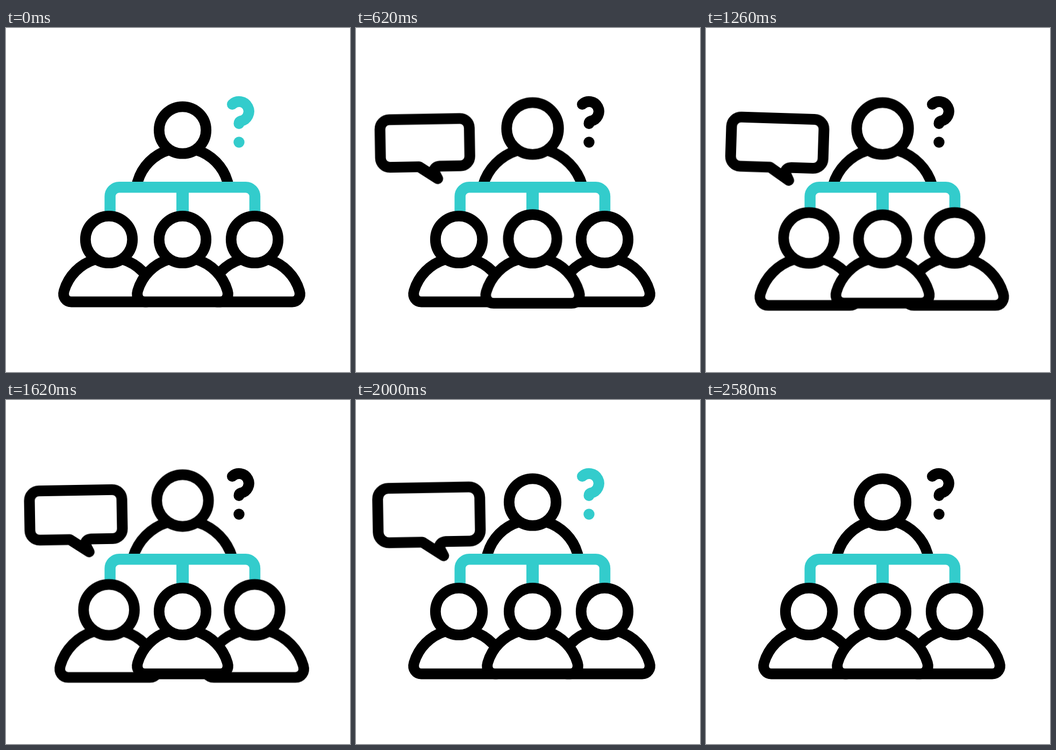
Animation, 640 px wide and 640 px high, one loop 2.72 s. Source, as an HTML page:

```html
<!DOCTYPE html>
<html lang="en">
<head>
<meta charset="utf-8">
<title>Team question</title>
<style>
  html, body { margin: 0; width: 100%; height: 100%; overflow: hidden; background: #fff; }
  svg { display: block; width: 100vw; height: 100vh; }

  /* outlines keep their weight while the shapes grow */
  path, circle { vector-effect: non-scaling-stroke; }
  .ink { fill: #fff; stroke: #000; stroke-width: 19.8; stroke-linejoin: round; }
  .teal { fill: none; stroke: #33cccc; stroke-width: 20.5; }
  .line { fill: none; stroke-linecap: round; stroke-width: 20; }

  .lead, .mid, .side, .pop, .swing, .ask {
    transform-box: view-box;
    animation: 2720ms cubic-bezier(.37, 0, .63, 1) infinite;
  }
  .lead { transform-origin: 328.5px 218.6px; animation-name: lead; }
  .mid { transform-origin: 328.5px 430.5px; animation-name: mid; }
  .side { animation-name: side; }
  .left { transform-origin: 191.5px 430.5px; }
  .right { transform-origin: 462.5px 430.5px; }
  .pop { transform-origin: 75px 214px; animation-name: pop; }
  .swing { transform-origin: 135px 266px; animation-name: swing; }
  .ask { color: #33cccc; animation-name: ask; animation-timing-function: step-end; }

  @keyframes lead {
    0%, 4.41%, 73.9%, 100% { transform: scale(1); }
    19.85%, 58.1% { transform: scale(1.105); }
  }
  @keyframes mid {
    0%, 16.54%, 52.2%, 100% { transform: scale(1); }
    33.1%, 35.66% { transform: scale(1.107); }
  }
  @keyframes side {
    0%, 35.48%, 70.96%, 100% { transform: scale(1); }
    51.65%, 54.4% { transform: scale(1.107); }
  }
  @keyframes pop {
    0%, 5.88% { transform: scale(0); visibility: hidden; }
    5.9% { visibility: visible; }
    14.7% { transform: scale(1.105); }
    22.06% { transform: scale(.965); }
    28%, 64% { transform: scale(1); }
    73.53% { transform: scale(1.105); }
    78.9% { visibility: visible; }
    79%, 100% { transform: scale(0); visibility: hidden; }
  }
  @keyframes swing {
    0%, 25.07%, 58.6%, 100% { transform: rotate(0deg); }
    27.87%, 39.04%, 50.22% { transform: rotate(-5deg); }
    33.46%, 44.63%, 55.81% { transform: rotate(5deg); }
  }
  @keyframes ask {
    0%, 27.2%, 61.03% { color: #33cccc; }
    10.29%, 44.12%, 77.94%, 100% { color: #000; }
  }
</style>
</head>
<body>
<svg viewBox="0 0 640 640">
  <defs>
    <circle id="head" cy="393.5" r="43.7"/>
    <g id="person">
      <path d="M-26 430.5A87 87 0 0 0 -83.5 489C-87 501 -79.5 509.5 -70 509.5H70C79.5 509.5 87 501 83.5 489A87 87 0 0 0 26 430.5"/>
      <use href="#head"/>
    </g>
  </defs>

  <g class="ink lead">
    <g transform="translate(328.5 -203.5)">
      <path d="M-26 430.5A87 87 0 0 0 -83.5 489L-85.3 496M85.3 496L83.5 489A87 87 0 0 0 26 430.5"/>
      <use href="#head"/>
    </g>
  </g>

  <g class="teal">
    <path d="M193.6 346V313.2A17 17 0 0 1 210.6 296.2H446A17 17 0 0 1 463 313.2V346"/>
    <path d="M328.5 296V346" stroke-width="23"/>
  </g>

  <g class="ink side left"><use href="#person" x="191.5"/></g>
  <g class="ink side right"><use href="#person" x="462.5"/></g>
  <g class="ink mid"><use href="#person" x="328.5"/></g>

  <g class="swing">
    <g class="pop">
      <path class="line" stroke="#000" stroke-linejoin="round" transform="rotate(-1 130 213.5)"
        d="M118 259.5L153.5 283L146 268Q149 259.5 158 259H198A18 18 0 0 0 216 241V186A18 18 0 0 0 198 168H62A18 18 0 0 0 44 186V241.5A18 18 0 0 0 62 259.5Z"/>
    </g>
  </g>

  <g class="ask">
    <path class="line" stroke="currentColor" d="M421 142A18.2 18.2 0 1 1 437 173Q433.5 174 433.5 178"/>
    <circle cx="433.5" cy="212.5" r="10.2" fill="currentColor"/>
  </g>
</svg>
</body>
</html>
```
